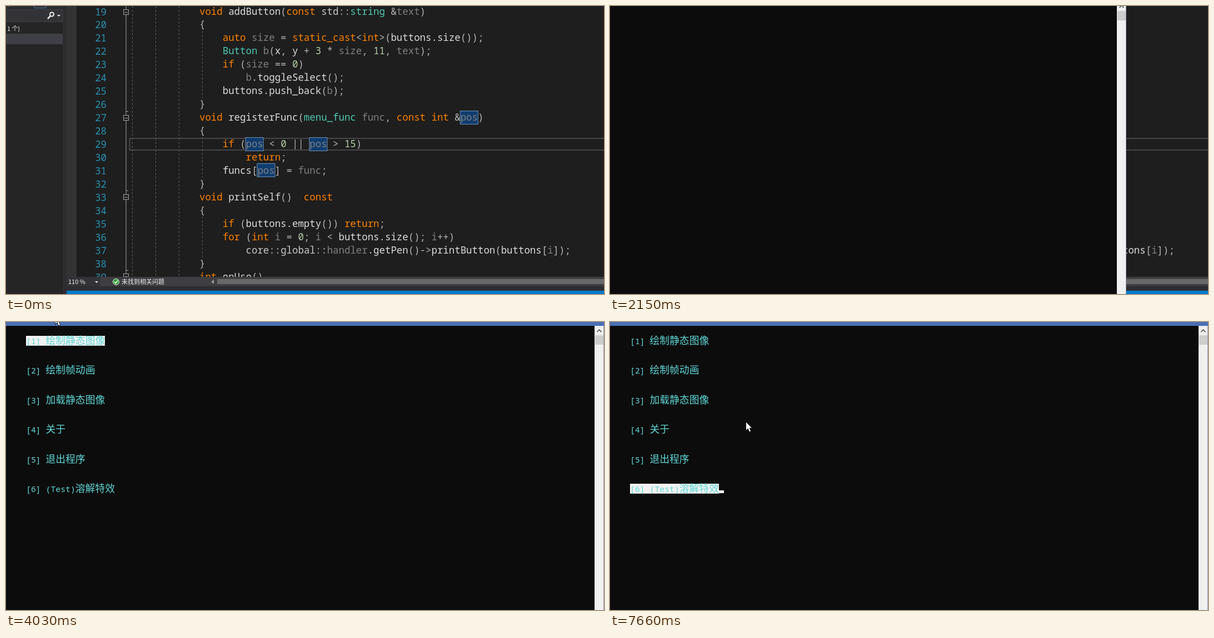
These frames come from a looping animation (1076x520 px, 8 s). An HTML page:

```html
<!DOCTYPE html>
<html lang="zh-CN">
<head>
<meta charset="utf-8">
<title>Editor and console menu</title>
<style>
html, body { margin: 0; width: 100%; height: 100%; overflow: hidden; background: #1e1e1e; }
svg { display: block; width: 1076px; height: 520px; }
text { white-space: pre; }
.code { font: 17.4px "Noto Sans Mono", monospace; }
.ui { font: 11px "Noto Sans CJK SC", "Noto Sans CJK", "Noto Sans", sans-serif; fill: #f1f1f1; }
.item { font: 14.8px "Noto Sans Mono", monospace; fill: #61d6d6; }
.wide { font: 17.8px "Noto Sans CJK SC", "Noto Sans CJK", sans-serif; }

.drag, .open, #pointer, .seen { animation: 8s linear infinite; }
.panel, .printed, .caret, .bar, .cell, .shown { animation: 8s step-end infinite; }
.panel { animation-name: panel; }
.drag { animation-name: drag; }
.open { animation-name: open; transform-origin: 538px 270px; }
.printed { animation-name: printed; }
.bar { animation-name: select; }
.caret { animation-name: caret, blink; }
.cell { animation-name: cell; }
#pointer { animation-name: pointer; }
.shown { animation-name: shown; }

@keyframes panel { 0%, 22.25% { opacity: 0 } 13.5% { opacity: 1 } }
@keyframes open {
  0%, 24.5% { opacity: 0; transform: scale(.92) }
  26.375%, 100% { opacity: 1; transform: none }
}
@keyframes printed { 0% { opacity: 0 } 28.625%, 100% { opacity: 1 } }
@keyframes drag {
  0%, 39% { transform: translate(-147px, -15px) }
  41.25% { transform: translate(-95px, -5px) }
  45% { transform: translate(-61px, 0) }
  49.25% { transform: translate(-5px, 0) }
  50.375%, 100% { transform: translate(0, 0) }
}
@keyframes pointer {
  0%, 16.25% { transform: translate(120px, -22px) }
  23%, 24.5% { transform: translate(145px, -6px) }
  26% { transform: translate(60px, -30px) }
  39% { transform: translate(-58px, -26px) }
  41.25% { transform: translate(-6px, -16px) }
  45% { transform: translate(28px, -11px) }
  49.25% { transform: translate(84px, -11px) }
  50.375%, 55.625% { transform: translate(89px, -11px) }
  58% { transform: translate(150px, 32px) }
  60% { transform: translate(205px, 90px) }
  62% { transform: translate(232px, 145px) }
  64.5%, 100% { transform: translate(245px, 181px) }
}
@keyframes shown { 0%, 83.625%, 100% { opacity: 1 } 64.625% { opacity: 0 } }
@keyframes blink {
  0%, 36.375%, 49.625%, 62.125%, 74.125% { opacity: 0 }
  29.75%, 43%, 56.25%, 67.75%, 80.25%, 100% { opacity: 1 }
}
@keyframes cell { 0%, 81%, 100% { opacity: 0 } 71.5% { opacity: 1 } }
@keyframes select {
  0% { transform: none; width: 142px }
  85.625% { transform: translateY(53.4px); width: 124px }
  89.375% { transform: translateY(106.8px); width: 142px }
  91.625% { transform: translateY(160.2px); width: 71px }
  93.5% { transform: translateY(213.5px); width: 107px }
  95.75%, 100% { transform: translateY(267px); width: 160px }
}
@keyframes caret {
  0% { transform: translate(196px, 304px) }
  85.625% { transform: translate(160px, 91px) }
  89.375% { transform: translate(178px, 144px) }
  91.625% { transform: translate(107px, 198px) }
  93.5% { transform: translate(143px, 251px) }
  95.75%, 100% { transform: translate(196px, 304px) }
}
</style>
</head>
<body>
<svg viewBox="0 0 1076 520">
  <!-- editor -->
  <rect width="1076" height="520" fill="#1e1e1e"/>
  <rect x="109" width="18" height="490" fill="#333"/>
  <path d="M222 239H1080M222 260H1080M222.500 238V261" stroke="#464646" stroke-width="2"/>
  <g id="guides" stroke="#5c5c5c" stroke-dasharray="4 3"/>
  <path d="M216 0V490M216 190.500H220M216 333.500H220M216 477.500H220" stroke="#a0a0a0" fill="none"/>
  <g id="folds" fill="#1e1e1e" stroke="#a5a5a5"/>
  <g id="marks" fill="#113d6f" stroke="#6f93ba"/>
  <g id="code" class="code"/>

  <!-- editor footer -->
  <rect x="109" y="489" width="967" height="17" fill="#3e3e42"/>
  <rect x="109" y="489" width="60" height="17" fill="#333337"/>
  <text class="ui" x="112" y="502">110 %</text>
  <path d="M160 497h6l-3 3z" fill="#f1f1f1"/>
  <circle cx="198" cy="498" r="5.500" fill="#339933" stroke="#e8f5e8"/>
  <path d="M195 498l2.300 2.500L201 495.500" fill="none" stroke="#fff" stroke-width="1.500"/>
  <text class="ui" x="208" y="502">未找到相关问题</text>
  <path d="M374 494v8l-5-4z" fill="#999"/>
  <rect x="380" y="493" width="696" height="9" fill="#686868"/>
  <rect x="109" y="506" width="967" height="8" fill="#2d2d30"/>
  <rect x="109" y="514" width="967" height="6" fill="#007acc"/>

  <!-- side pane -->
  <rect width="109" height="520" fill="#2d2d30"/>
  <rect y="29" width="102" height="491" fill="#252526"/>
  <rect x="-1" y="6.500" width="103" height="22" fill="#333337" stroke="#3f3f46"/>
  <rect x="51" y="-6" width="21" height="9.500" fill="#2d2d30" stroke="#3f78b5"/>
  <path d="M2 0h4" stroke="#999"/>
  <circle cx="82.500" cy="15" r="3.500" fill="none" stroke="#f1f1f1" stroke-width="2"/>
  <path d="M80 18l-5 5" stroke="#f1f1f1" stroke-width="2.500"/>
  <path d="M92 16h6l-3 3z" fill="#f1f1f1"/>
  <text class="ui" x="2" y="45">1 个)</text>
  <rect y="50" width="102" height="19" fill="#3f3f46"/>

  <rect class="panel" x="85.500" y="-10" width="283" height="323.500" fill="#1b1b1c" stroke="#333337"/>

  <!-- console window -->
  <g class="drag"><g class="open">
    <rect x="-1" y="-24" width="1077" height="624" fill="#4a70b5"/>
    <rect x="-1" y="7" width="1076.500" height="593" fill="#0c0c0c"/>
    <rect x="1059" y="7" width="16.500" height="593" fill="#f0f0f0"/>
    <rect x="1060" y="24" width="15" height="17" fill="#cdcdcd"/>
    <path d="M1063.500 18l4-4 4 4" fill="none" stroke="#505050" stroke-width="1.700"/>
    <g class="printed">
      <rect class="bar" x="36" y="25" width="142" height="17.800" fill="#f2f2f2"/>
      <g id="menu"/>
      <rect class="caret" width="9" height="5" fill="#f2f2f2"/>
      <rect class="cell" x="240" y="167" width="9" height="18" fill="#ccc"/>
    </g>
  </g></g>

  <g class="shown"><path id="pointer" d="M0 0V14L3.300 11 5.800 17 8.200 16 5.700 10.300H10z"
    fill="#fff" stroke="#000" stroke-width="1.500" paint-order="stroke"/></g>
</svg>
<script>
const LINE = 23.95, CHAR = 10.44, LEFT = 348, FIRST = 19;
const $ = id => document.getElementById(id);

function add(parent, tag, attrs, text = '') {
  const node = document.createElementNS('http://www.w3.org/2000/svg', tag);
  for (const key in attrs) node.setAttribute(key, attrs[key]);
  node.textContent = text;
  return parent.appendChild(node);
}

const source = `void addButton(const std::string &text)
{
    auto size = static_cast<int>(buttons.size());
    Button b(x, y + 3 * size, 11, text);
    if (size == 0)
        b.toggleSelect();
    buttons.push_back(b);
}
void registerFunc(menu_func func, const int &pos)
{
    if (pos < 0 || pos > 15)
        return;
    funcs[pos] = func;
}
void printSelf()  const
{
    if (buttons.empty()) return;
    for (int i = 0; i < buttons.size(); i++)
        core::global::handler.getPen()->printButton(buttons[i]);
}
int onUse()`.split('\n');

const palette = [
  [/^(void|const|auto|static_cast|int|if|return|for)$/, '#ff8000'],
  [/^(string|Button|menu_func)$/, '#4ec9b0'],
  [/^(text|size|b|func|pos|i|handler)$/, '#7f7f7f'],
  [/^\d+$/, '#b5cea8'],
  [/^(std|core|global)$/, '#c8c8c8'],
  [/\w/, '#dcdcdc'],
  [/./, '#b4b4b4']
];
const colorOf = token => palette.find(([rule]) => rule.test(token))[1];

source.forEach((line, row) => {
  const y = 15.5 + row * LINE;
  add($('code'), 'text', { x: 181, y: y + 1, fill: '#2b91af', 'text-anchor': 'end' }, FIRST + row);
  const body = line.trimStart();
  const text = add($('code'), 'text', { x: LEFT + (line.length - body.length) * CHAR, y });
  for (const token of body.match(/\.?\w+|[^\w.]+|\./g))
    add(text, 'tspan', { fill: colorOf(token) }, token);
  for (const hit of line.matchAll(/\bpos\b/g))
    add($('marks'), 'rect', { x: LEFT + hit.index * CHAR - 0.5, y: Math.round(row * LINE - 2) - 0.5, width: 32, height: 24 });
});

const guide = (x, top, bottom) => add($('guides'), 'path', { d: `M${x + 0.5} ${top}V${bottom}` });
[227, 269, 311].forEach(x => guide(x, 0, 489));
[[45, 167], [237, 310], [380, 454]].forEach(span => guide(353, ...span));

[11, 202, 345, 488].forEach(y => {
  add($('folds'), 'rect', { x: 211.5, y: y - 4.5, width: 9, height: 9 });
  add($('folds'), 'path', { d: `M213 ${y + 0.5}h6` });
});

['绘制静态图像', '绘制帧动画', '加载静态图像', '关于', '退出程序', '(Test)溶解特效'].forEach((label, i) => {
  const [, latin, wide] = label.match(/^([\x20-\x7e]*)(.*)$/);
  const text = add($('menu'), 'text', { class: 'item', x: 36, y: 40 + i * 53.4 }, `[${i + 1}] ${latin}`);
  add(text, 'tspan', { class: 'wide' }, wide);
});
</script>
</body>
</html>
```
